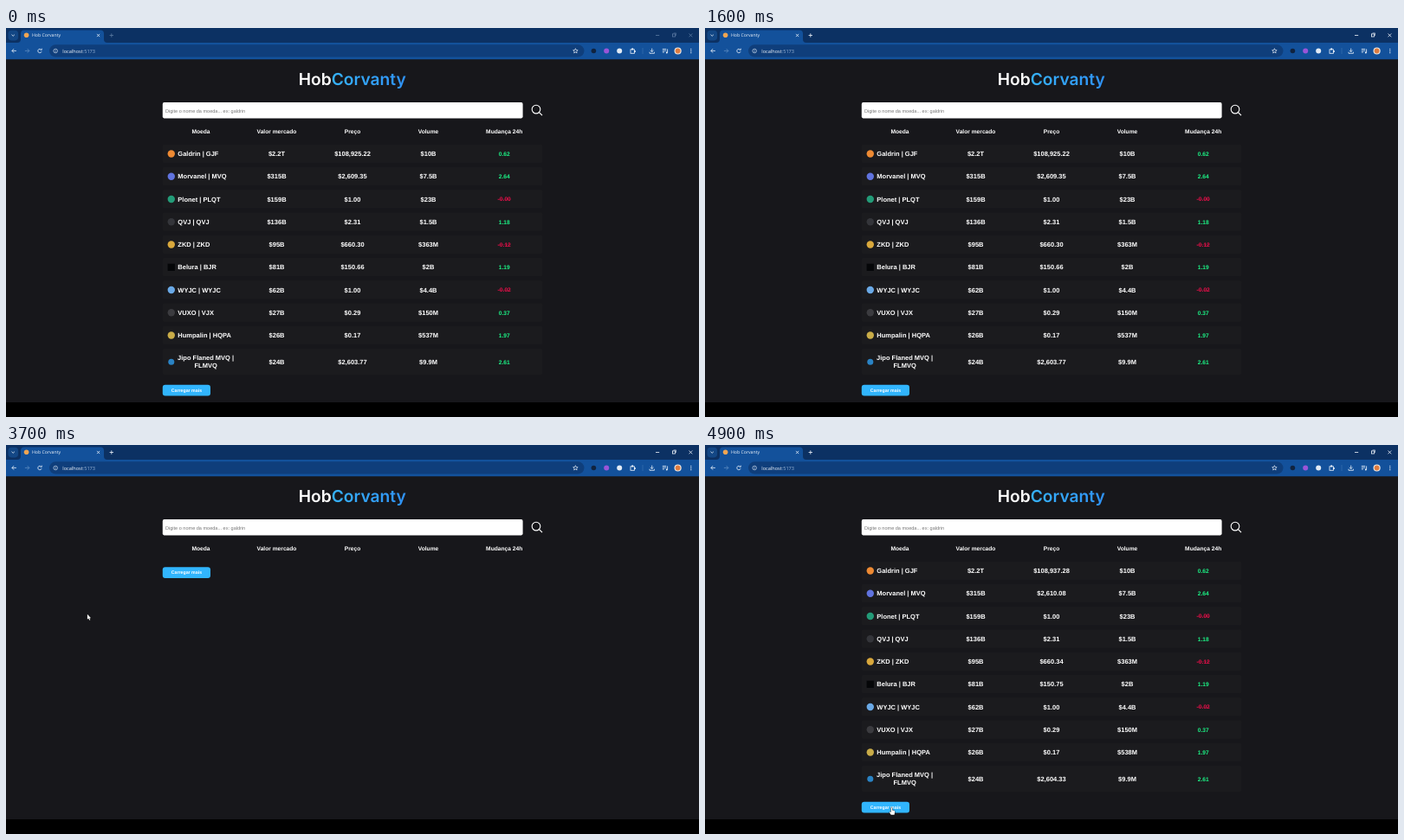
Animation, 800 px wide and 450 px high, one loop 5000 ms. Source, as an HTML page with a canvas:

```html
<!DOCTYPE html>
<html lang="pt-BR">
<head>
<meta charset="utf-8">
<title>Hob Corvanty</title>
<style>
  html, body { margin: 0; width: 100%; height: 100%; overflow: hidden; background: #17171b; }
  canvas { display: block; width: 800px; height: 450px; }
</style>
</head>
<body>
<canvas id="stage"></canvas>
<script>
const W = 800, H = 450, LOOP = 5000, STEP = 100;
const FOCUS = 1400, CURSOR_IN = 1700, CLEAR = 3400, RELOADED = 3900, MOVE = 4100, END = 4900;
const ARIAL = '"Liberation Sans", Arial, sans-serif';
const UI = '"Open Sans", "Noto Sans", sans-serif';
const COLS = [225, 312.5, 400, 487.5, 575.2];
const HEADS = ['Moeda', 'Valor mercado', 'Preço', 'Volume', 'Mudança 24h'];

// icon colour, name, market cap, price, volume, change, refreshed price, refreshed volume
const COINS = [
  ['#ee8a33', 'Galdrin | GJF', '$2.2T', '$108,925.22', '$10B', '0.62', '$108,937.28'],
  ['#6073de', 'Morvanel | MVQ', '$315B', '$2,609.35', '$7.5B', '2.64', '$2,610.08'],
  ['#239b78', 'Plonet | PLQT', '$159B', '$1.00', '$23B', '-0.00'],
  ['#34353a', 'QVJ | QVJ', '$136B', '$2.31', '$1.5B', '1.18'],
  ['#d9a83c', 'ZKD | ZKD', '$95B', '$660.30', '$363M', '-0.12', '$660.34'],
  ['#050608', 'Belura | BJR', '$81B', '$150.66', '$2B', '1.19', '$150.75'],
  ['#6aa9e6', 'WYJC | WYJC', '$62B', '$1.00', '$4.4B', '-0.02'],
  ['#3b3b3f', 'VUXO | VJX', '$27B', '$0.29', '$150M', '0.37'],
  ['#c9ac48', 'Humpalin | HQPA', '$26B', '$0.17', '$537M', '1.97', '$0.17', '$538M'],
  ['#2a83c4', 'Jipo Flaned MVQ |', '$24B', '$2,603.77', '$9.9M', '2.61', '$2,604.33']
];

const canvas = document.getElementById('stage');
const c = canvas.getContext('2d');
const dpr = window.devicePixelRatio || 1;
canvas.width = W * dpr;
canvas.height = H * dpr;
c.textRendering = 'geometricPrecision';

function rect(x, y, w, h, color, r = 0) {
  c.fillStyle = color;
  c.beginPath();
  c.roundRect(x, y, w, h, r);
  c.fill();
}

function disc(x, y, r, color) {
  c.fillStyle = color;
  c.beginPath();
  c.arc(x, y, r, 0, Math.PI * 2);
  c.fill();
}

function ring(x, y, r, color, width, from = 0, to = Math.PI * 2) {
  c.strokeStyle = color;
  c.lineWidth = width;
  c.beginPath();
  c.arc(x, y, r, from, to);
  c.stroke();
}

function line(points, color, width = 0.8) {
  c.strokeStyle = color;
  c.lineWidth = width;
  c.beginPath();
  points.forEach(([x, y]) => c.lineTo(x, y));
  c.stroke();
}

function cross(x, y, r, color) {
  line([[x - r, y - r], [x + r, y + r]], color);
  line([[x - r, y + r], [x + r, y - r]], color);
}

// y is the middle of the capitals
function text(s, x, y, size, color, align = 'center', weight = 'bold', family = ARIAL) {
  c.font = `${weight} ${size}px ${family}`;
  c.textAlign = align;
  c.fillStyle = color;
  c.fillText(s, x, y + size * 0.36);
  return c.measureText(s).width;
}

function tabStrip(active) {
  const ink = active ? '#f0f5fb' : '#5c7ba3';
  rect(0, 0, W, 18, '#0c3163');
  rect(2.5, 2.7, 11.6, 11.7, '#134785', 3.8);
  line([[6.5, 7.7], [8.2, 9.3], [9.9, 7.7]], '#eef4fb');
  c.fillStyle = '#13519b';
  c.fill(new Path2D('M13 17Q17 17 17 13V6.5Q17 2.5 21 2.5H109Q113 2.5 113 6.5V13Q113 17 117 17Z'));
  disc(23.6, 8.3, 2.8, '#f0a552');
  text('Hob Corvanty', 30, 8.6, 5.2, '#f2f6fb', 'left', '400', UI);
  cross(106.6, 8.5, 1.6, '#e8f0f9');
  line([[119.6, 8.5], [124, 8.5]], ink);
  line([[121.8, 6.3], [121.8, 10.7]], ink);
  line([[750, 8.5], [754.2, 8.5]], ink);
  c.strokeRect(769.4, 6.9, 3.1, 3.1);
  line([[770.6, 5.9], [773.5, 5.9], [773.5, 8.9]], ink, 0.6);
  cross(790.4, 8.4, 1.9, ink);
}

function arrow(x, dir, color) {
  line([[x - 2.5, 26.4], [x + 2.5, 26.4]], color);
  line([[x + dir * 0.3, 24.1], [x + dir * 2.5, 26.4], [x + dir * 0.3, 28.7]], color);
}

function star(x, y, r) {
  const points = Array.from({ length: 11 }, (_, i) => {
    const a = i * Math.PI / 5 - Math.PI / 2, k = i % 2 ? r * 0.45 : r;
    return [x + k * Math.cos(a), y + k * Math.sin(a)];
  });
  line(points, '#e8f0fa', 0.7);
}

function toolbar() {
  const ink = '#edf4fc';
  rect(0, 17, W, 19.2, '#13519b');
  arrow(9.4, -1, ink);
  arrow(24.4, 1, '#5d8cc2');
  ring(39, 26.5, 2.2, ink, 0.8, 0.3, 5.5);
  line([[41.3, 23.6], [41.3, 25.4], [39.6, 25.4]], ink, 0.7);
  rect(50, 19.3, 617.5, 14.3, '#0f3e7b', 7.15);
  ring(57.2, 26.5, 2.3, '#dce8f6', 0.65);
  line([[57.2, 26.2], [57.2, 27.8]], '#dce8f6', 0.6);
  disc(57.2, 25.2, 0.4, '#dce8f6');
  const w = text('localhost', 65.3, 26.7, 5.6, '#f4f8fd', 'left', '400', UI);
  text(':5173', 65.3 + w, 26.7, 5.6, '#9ab5d6', 'left', '400', UI);
  star(657.4, 26.6, 2.9);
  disc(678.4, 26.5, 2.8, '#10233f');
  disc(693.2, 26.5, 3, '#9a55d8');
  disc(708.2, 26.5, 3, '#e2ebf5');
  c.strokeStyle = ink;
  c.lineWidth = 0.8;
  c.strokeRect(721, 24.8, 4.5, 4.5);
  disc(723.2, 24.4, 1.1, ink);
  disc(725.9, 27, 1.1, ink);
  line([[735, 23], [735, 30]], '#3f78b8', 0.6);
  line([[745.7, 23.6], [745.7, 27.4]], ink);
  line([[743.9, 25.8], [745.7, 27.6], [747.5, 25.8]], ink);
  line([[743, 27.7], [743, 29.3], [748.4, 29.3], [748.4, 27.7]], ink);
  [24.4, 26.2].forEach(y => line([[757.8, y], [762.2, y]], ink));
  line([[757.8, 28], [760, 28]], ink);
  line([[763.6, 24.4], [763.6, 28.3]], ink);
  disc(762.8, 28.4, 1, ink);
  disc(775.6, 26.5, 4.1, '#ece7e2');
  disc(775.6, 26.5, 2.9, '#dd7b3f');
  [24.3, 26.5, 28.7].forEach(y => disc(790.8, y, 0.65, ink));
}

function header() {
  const family = 'Inter, sans-serif', size = 19.2;
  c.font = `600 ${size}px ${family}`;
  const a = c.measureText('Hob').width, b = c.measureText('Corvanty').width;
  const x = 399.7 - (a + b) / 2;
  const blue = c.createLinearGradient(x + a, 0, x + a + b, 0);
  blue.addColorStop(0, '#36b2fb');
  blue.addColorStop(1, '#2f92f6');
  text('Hob', x, 58.8, size, '#fff', 'left', '600', family);
  text('Corvanty', x + a, 58.8, size, blue, 'left', '600', family);

  rect(180.8, 86.1, 415.8, 18.3, '#fff', 1.8);
  text('Digite o nome da moeda... ex: galdrin', 184, 95.8, 5.55, '#777', 'left', '400');
  ring(612, 94.1, 4.8, '#fff', 1.1);
  line([[615.5, 97.6], [619, 101.1]], '#fff', 1.3);
  HEADS.forEach((s, i) => text(s, COLS[i], 119.8, 6.67, '#fff'));
}

function row(coin, i, fresh) {
  const [color, name, cap, price, volume, change, newPrice, newVolume] = coin;
  const last = i === COINS.length - 1;
  const y = last ? 386.1 : 145.4 + i * 26.25;
  const half = last ? 15 : 10.6;
  rect(180.8, y - half, 438.6, half * 2, '#1b1b1e', 2);
  if (i === 5) rect(186.6, y - 4, 8.3, 8.3, color);
  else disc(190.8, y + 0.1, last ? 3.5 : 4.2, color);
  if (last) {
    text(name, 230.6, y - 4.4, 7.5, '#fff');
    text('FLMVQ', 230.6, y + 4.4, 7.5, '#fff');
  } else {
    text(name, 198.3, y, 7.5, '#fff', 'left');
  }
  text(cap, COLS[1], y, 7.5, '#fff');
  text(fresh && newPrice || price, COLS[2], y, 7.5, '#fff');
  text(fresh && newVolume || volume, COLS[3], y, 7.5, '#fff');
  const loss = change[0] === '-';
  const w = text(change, COLS[4], y, 6.67, loss ? '#e20f48' : '#1cf486');
  if (loss) line([[COLS[4] - w / 2, y + 0.3], [COLS[4] + w / 2, y + 0.3]], '#c9104399', 0.7);
}

function button(y) {
  rect(180.8, y, 55.2, 12.6, '#31b5fd', 3);
  text('Carregar mais', 208.4, y + 6.3, 5.25, '#fff');
}

function shape(x, y, d) {
  const p = new Path2D(d);
  c.save();
  c.translate(x, y);
  c.lineWidth = 0.8;
  c.lineJoin = 'round';
  c.strokeStyle = '#111';
  c.fillStyle = '#fff';
  c.stroke(p);
  c.fill(p);
  c.restore();
}

function cursor(t) {
  if (t < CURSOR_IN) return;
  const mix = (a, b, k) => a + (b - a) * k;
  const clamp = v => Math.min(1, Math.max(0, v));
  const lift = clamp((t - RELOADED) / (MOVE - RELOADED));
  const k = clamp((t - MOVE) / (END - MOVE));
  const ease = k * k * (3 - 2 * k);
  const x = mix(mix(93.9, 94.4, lift), 215.4, ease);
  const y = mix(mix(195.7, 192, lift), 419.2, ease);
  const over = x > 181 && x < 236 && y > 413 && y < 426;
  shape(x, y, over
    ? 'M-.7 .5Q0-.4 .7 .5V3.2L3.1 3.9Q3.9 4.2 3.8 5L3.2 8.6H-.7L-2.5 5.7Q-2.4 4.8-1.5 5.2L-.7 5.8Z'
    : 'M0 0V6.1L1.4 4.9L2.4 7L3.4 6.5L2.5 4.5H4.2Z');
}

function draw(t) {
  c.setTransform(dpr, 0, 0, dpr, 0, 0);
  rect(0, 0, W, H, '#17171b');
  rect(0, 433, W, 17, '#000');
  tabStrip(t >= FOCUS);
  toolbar();
  header();
  const empty = t >= CLEAR && t < RELOADED;
  if (!empty) COINS.forEach((coin, i) => row(coin, i, t >= RELOADED));
  button(empty ? 141.3 : 412.8);
  cursor(t);
}

const start = performance.now();
function tick() {
  const t = (performance.now() - start) % LOOP;
  draw(Math.floor(t / STEP) * STEP);
  requestAnimationFrame(tick);
}
tick();
</script>
</body>
</html>
```
